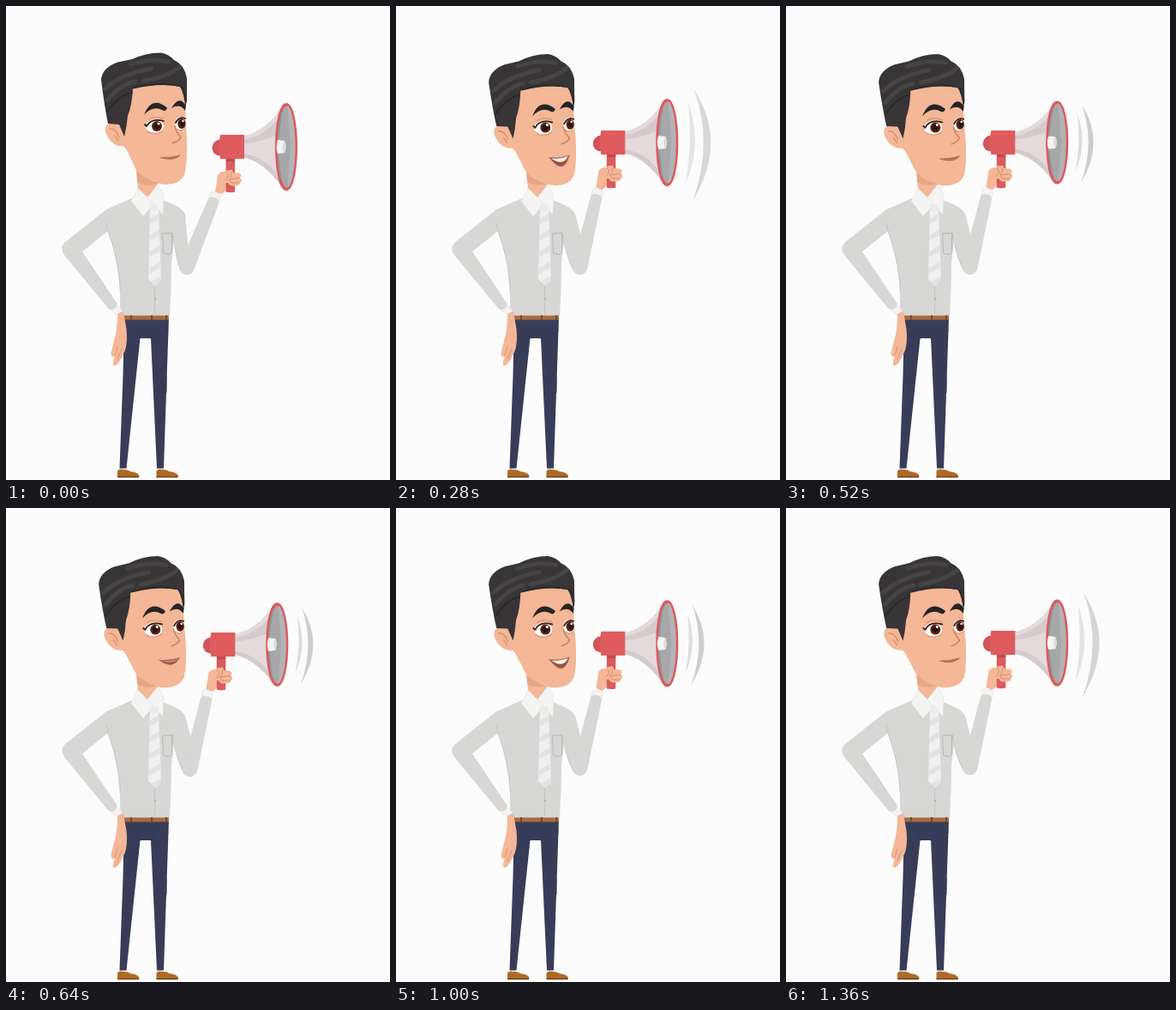
These frames come from a looping animation (448 by 552 pixels, 1400 ms). An HTML page:

```html
<!DOCTYPE html>
<html lang="en">
<head>
<meta charset="utf-8">
<title>Man with a megaphone</title>
<style>
  html, body { margin: 0; width: 100%; height: 100%; overflow: hidden; background: #fcfcfc; }
  svg { display: block; width: 448px; height: 552px; }
  .skin { fill: #f4b797; }
  .shirt { fill: #d7d7d5; }
  .white { fill: #f4f4f3; }
  .line { fill: none; stroke-linecap: round; stroke-linejoin: round; }
</style>
</head>
<body>
<svg viewBox="0 0 448 552">
  <defs>
    <path id="shoe" d="M130 548V541.500Q132 538.500 137 540Q142 539.500 145 542Q154 543 155.500 547L155 549H130Z"/>
    <clipPath id="tieShape"><path d="M168 236L178 236L181 319L174 326L166 318Z"/></clipPath>
    <clipPath id="hairShape"><path d="M111 86Q112 72 130 65.500L147 62Q164 54 181 54.500Q190 56 196 63Q208 68 211 84L211 110L209 117Q208 102 203 94Q180 89 148 96.500Q147 116 142 128Q141 140 138 152L132 138L119 137Q115 118 111 86Z"/></clipPath>
    <clipPath id="bell"><ellipse cx="327" cy="164" rx="10.500" ry="48.500"/></clipPath>
  </defs>

  <!-- legs and shoes -->
  <path class="white" d="M133 537H141V543H133ZM177 537H184V543H177Z"/>
  <g fill="#ad6a25">
    <use href="#shoe"/><use href="#shoe" x="45.500"/>
  </g>
  <path d="M130 548.500H155M175.500 548.500H200.500" stroke="#71431d" stroke-width="1.300"/>
  <path fill="#373d59" d="M138 363H190L187 450L184 538.500H176L169 387H156.500L140.500 538.500H132.500L136.500 430Z"/>
  <path class="line" stroke="#2e3552" d="M188 374L189 378M187 432V450M156.500 387L153 380M169 387L172 380"/>

  <!-- torso and left arm -->
  <path class="shirt" d="M149 223L117 237L69 275Q62 282 68 290L120 353Q127 356 130 347L89 286L119 262Q127 285 130 303Q134 330 133 361H191Q193 330 193 300L197 265L210 245L204 236L183 226Z"/>
  <path class="line" stroke="#bfbfbf" stroke-width=".8" d="M119 262L117 253M119 262Q131 294 133.500 330M173.500 326V358"/>
  <path class="line" stroke="#b7b7b7" d="M183 265L193.500 264.500V287L190 289.500L184 288Z"/>
  <circle cx="174" cy="341" r="1" fill="#aaa"/>
  <path fill="#a96b3d" d="M137 360.500H190V365.500H137Z"/>
  <path d="M146 360V366M170 360V366M187 360V366" stroke="#65412d" stroke-width="1.500"/>
  <path class="skin" d="M130 358L137 356L140.500 376Q142 391 139 401L134 411Q130 419 126 419Q123 417 127 408Q123 410 122.500 404L126 390Q130 378 130 358Z"/>
  <path class="line" stroke="#d99673" d="M135 399L130 411M130 397L127 407"/>
  <path class="white" d="M123 355L131 349L136 355L129 359Z" stroke="#dedede" stroke-width=".6"/>

  <!-- right upper arm -->
  <path id="upperArm" class="shirt"/>
  <path id="armFold" class="line" stroke="#b9b9b9" stroke-width=".8"/>

  <!-- neck, collar, tie -->
  <path class="skin" d="M152 188L178 200L176 209L165 225L154 214Z"/>
  <path fill="#e5a685" d="M152 188L177 202V207Q162 211 153 205Z"/>
  <g class="white" stroke="#e2e2e2" stroke-width=".6">
    <path d="M177 208L184 220L183 243L172 231L165 223Z"/>
    <path d="M154 212L165 223L172 231L160 245L146 227Z"/>
  </g>
  <g clip-path="url(#tieShape)">
    <path fill="#f0f0ef" d="M160 230H185V330H160Z"/>
    <path d="M162 254L184 242M162 273L184 261M162 292L184 280M162 311L184 299M162 328L184 316" stroke="#e2e3e4" stroke-width="6"/>
  </g>
  <path fill="#ebebea" d="M168 231H177L178 237L173 240L168 237Z"/>

  <!-- head -->
  <g id="head">
    <path class="skin" d="M136 138Q125 133 118 138Q113 143 119 153Q126 165 139 163Z"/>
    <path class="line" stroke="#d78f6c" stroke-width="1.300" d="M121 143Q128 142 132 153M127 151L131 157"/>
    <path class="skin" d="M146 88H205Q209 100 209 118L211 156Q212 182 208 197Q202 208 187 208Q170 207 153 193L141 168L135 160V137Z"/>
    <g clip-path="url(#hairShape)">
      <path fill="#373536" d="M105 50H220V155H105Z"/>
      <path class="line" stroke="#454344" stroke-width="5" d="M116 96Q134 79 170 73M118 110Q134 91 151 88M145 68Q170 60 190 65M160 87Q188 83 203 71"/>
      <path class="line" stroke="#2b292a" stroke-width="2" d="M118 123Q134 102 148 101M150 95Q180 87 206 95L211 116"/>
    </g>
    <path fill="#262424" d="M161 126.500Q170 104 188 118.500Q187 123 183 121.500Q172 115 161 126.500ZM193 119Q202 103 210 116L209 122Q203 113 193 119Z"/>
    <ellipse cx="173.500" cy="140" rx="10.500" ry="7.800" fill="#fff"/>
    <ellipse cx="203.500" cy="137" rx="6.300" ry="7.800" fill="#fff"/>
    <g fill="#552319">
      <circle cx="176" cy="140" r="6"/><ellipse cx="205" cy="137" rx="4.700" ry="5.900"/>
    </g>
    <g fill="#2a1210">
      <circle cx="176" cy="140" r="3.300"/><ellipse cx="205.500" cy="137" rx="2.500" ry="3.300"/>
    </g>
    <g fill="#fff">
      <circle cx="178" cy="137" r="1.500"/><circle cx="206.500" cy="134" r="1.200"/>
    </g>
    <path class="line" stroke="#30211d" stroke-width="1.800" d="M162 138L164 140Q169 130 184 134M198 136Q202 128 209 131"/>
    <path class="line" stroke="#d39371" d="M165 146Q173 151 183 146M199 143Q204 147 208 143M166 132Q173 127 184 131"/>
    <path class="line" stroke="#c88261" stroke-width="1.500" d="M197 140Q198 146 204 153Q201 158 194.500 159.500"/>
    <path id="mouth" stroke="#b1705a"/>
    <path id="teeth" fill="#fbf3ec"/>
  </g>

  <!-- forearm -->
  <g id="forearm">
    <path class="white" d="M-6 -83L-5.500 -93H6L7 -83Z" stroke="#e2e2e2" stroke-width=".6"/>
    <path class="shirt" d="M-9 0L-6.500 -82Q-5 -88 0 -87Q6 -88 7 -82L9 0A9 9 0 0 1 -9 0Z"/>
  </g>

  <!-- megaphone -->
  <g id="megaphone">
    <g id="horn">
      <path fill="#e4dadb" d="M275 151.500Q304 147 324 114V214Q304 181 275 176Z"/>
      <path fill="#d5cacc" d="M275 156Q303 152 320 128L318 149Q300 158 275 161ZM275 172Q300 173 319 199L322 211Q300 180 275 176Z"/>
      <ellipse cx="327" cy="164" rx="11.300" ry="49.300" fill="#a6a7a9" stroke="#dc5a5c" stroke-width="3.500"/>
      <g clip-path="url(#bell)">
        <path fill="#949597" d="M314 110H324L317 164L324 220H314Z"/>
        <path fill="#b2b3b5" d="M328 112L342 110V220L328 216L332 164Z"/>
      </g>
      <path fill="#f5f3f3" d="M317 156L325 157Q328 164 325 171L317 172Q314 164 317 156Z"/>
      <path fill="#dcdadb" d="M324 157Q329 164 324 171Q322 164 324 157Z"/>
    </g>
    <path class="skin" d="M244 216Q246 206 247 197Q251 191 259 194V211Q255 217 251 219Z"/>
    <path fill="#d2545a" d="M251 156H247Q240.500 159 240.500 165.500Q241 172 247 174H251Z"/>
    <path fill="#dc5a5d" d="M256.500 176H267V216.500Q262 218 256.500 216.500Z"/>
    <path fill="#bf494e" d="M257 177H267V181H257Z"/>
    <path fill="#df5b5d" d="M250 150H278V178H250Q247 164 250 150Z"/>
    <path class="skin" d="M253 197Q256 190 261 191Q264 189 265 194L272 194.500Q276 197 273 200Q277 203 273 206Q272 210 267 209Q262 211 259 206L253 206Z"/>
    <path class="line" stroke="#d58f6d" d="M257 194Q262 197 256 203M263 194Q264 199 260 202L272 200.500M261 203L263 206L272 206"/>
  </g>

  <!-- sound waves -->
  <g id="waves" fill="#b3b3b8">
    <path d="M7 -45.500Q35 -2 6 45.500Q23 -2 7 -45.500Z"/>
    <path opacity=".65" d="M2 -35Q14.500 0 -.5 32Q6 0 2 -35Z"/>
  </g>
</svg>
<script>
const LOOP = 1400, STEP = 40;
const el = id => document.getElementById(id);
const set = (id, name, value) => el(id).setAttribute(name, value);

// Smoothly interpolates [time, value] keys.
function track(t, keys) {
  let i = 1;
  while (i < keys.length - 1 && t > keys[i][0]) i++;
  const [t0, a] = keys[i - 1], [t1, b] = keys[i];
  const p = Math.min(1, Math.max(0, (t - t0) / (t1 - t0)));
  return a + (b - a) * p * p * (3 - 2 * p);
}

const MOUTH = [[0, 0], [120, .55], [280, 1], [520, .08], [800, .85], [1160, 1.1], [1360, 0]];
const HORN = [[0, 1], [280, 1], [520, .95], [800, .96], [1160, 1.01], [1360, .99]];
const LIFT = [[800, 0], [1160, -2]];
const WAVE_SIZE = [[120, .6], [280, 1.41], [520, 1], [800, .96], [1160, 1.09], [1360, 1.33]];
const WAVE_ALPHA = [[120, 0], [280, .5], [520, .65], [800, .62], [1160, .62], [1360, .52]];
const WAVE_Y = [[280, 162], [520, 160.5], [800, 160.5], [1160, 158.5], [1360, 159.5]];

function draw(t) {
  const raise = 1 - (1 - Math.min(1, t / 240)) ** 3;
  const lift = track(t, LIFT);
  const ex = 211 + 3.5 * raise, ey = 304 + lift;

  set('head', 'transform', `translate(0 ${1.5 * raise}) rotate(${-1.3 * raise} 180 215)`);
  set('upperArm', 'd', `M185 227Q204 233 209 242L${ex + 1} ${277 - 10 * raise}L${ex + 8} ${ey}L${ex - 8} ${ey + 4}Q198 288 195 265Z`);
  set('armFold', 'd', `M194 264Q198 290 ${ex - 8} ${ey + 2}`);
  set('forearm', 'transform', `translate(${ex} ${ey}) rotate(${21.8 - 8.7 * raise})`);
  set('megaphone', 'transform', `translate(${-10.7 * raise} ${-5 * raise + lift})`);
  set('horn', 'transform', `translate(0 164) scale(1 ${track(t, HORN)}) translate(0 -164)`);

  const open = track(t, MOUTH);
  set('mouth', 'd', `M180 ${176.5 - 1.5 * open}Q192 177 203 ${174 - open}Q196 ${181 + 16 * open} 180 ${176.5 - 1.5 * open}Z`);
  set('mouth', 'fill', open > .25 ? '#95523f' : '#b9765e');
  set('teeth', 'd', `M182 ${177 - open}Q192 177.5 201.5 ${175 - open}Q196 ${179 + 7 * open} 182 ${177 - open}Z`);
  set('teeth', 'opacity', Math.min(1, Math.max(0, open * 2 - .4)));

  set('waves', 'transform', `translate(338 ${track(t, WAVE_Y)}) scale(${track(t, WAVE_SIZE)})`);
  set('waves', 'opacity', track(t, WAVE_ALPHA));
}

const start = performance.now();
function tick() {
  const t = (performance.now() - start) % LOOP;
  draw(Math.floor(t / STEP) * STEP);
  requestAnimationFrame(tick);
}
tick();
</script>
</body>
</html>
```
